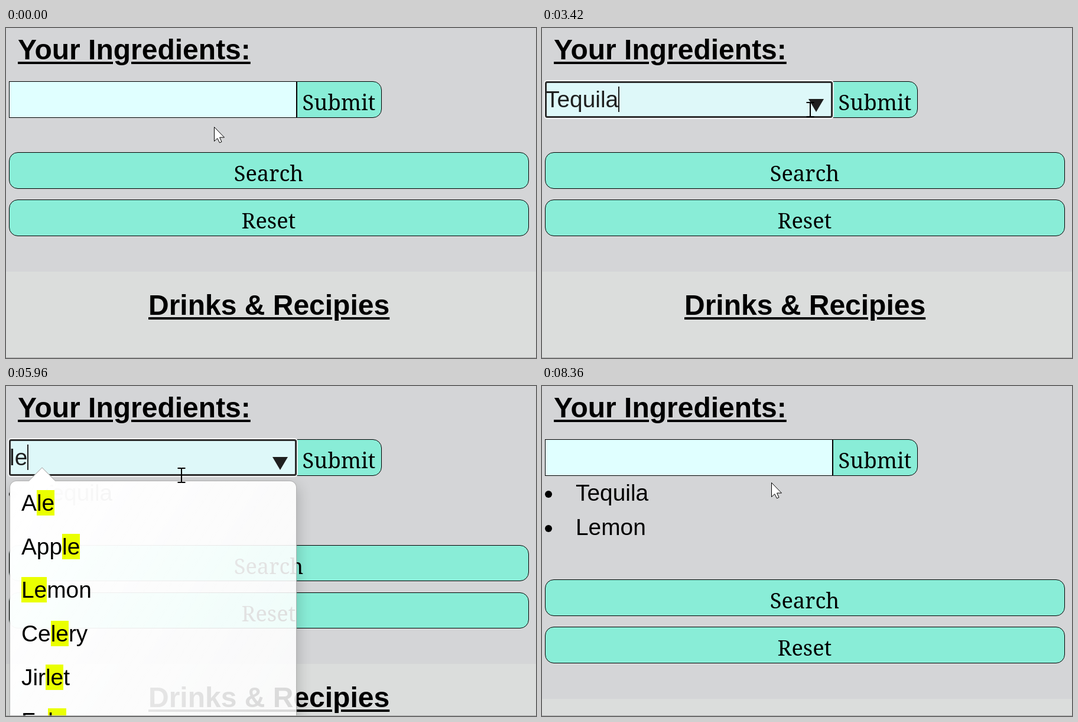
An HTML page for the animation above (8410 ms loop, 897 by 558 pixels).

```html
<!DOCTYPE html>
<html lang="en">
<head>
<meta charset="utf-8">
<title>Ingredient picker</title>
<style>
  html, body { margin: 0; width: 100%; height: 100%; overflow: hidden; }
  #stage { position: relative; width: 897px; height: 558px; overflow: hidden; background: #d4d5d7;
    color: #000; font: 38.88px/58px "Liberation Sans", Arial, sans-serif; }
  #stage > *, #field > * { position: absolute; box-sizing: border-box; white-space: pre; }
  h1 { margin: 0; font-size: 48px; line-height: 60px; text-decoration: underline 4px; text-underline-offset: 4px; }
  .button { left: 5px; width: 880px; height: 61.65px; border: 1px solid #000; border-radius: 15px; background: #89edd7;
    font: 36.3px/68px "Noto Serif", serif; text-align: center; text-indent: -1px; }
  #submit { left: 492px; top: 90.25px; width: 144px; border-radius: 0 15px 15px 0; }
  #field { left: 5px; top: 90px; width: 487px; height: 62px; }
  #box { inset: 0; border: 1px solid #000; background: #e0ffff; }
  #ring { inset: 0; border: 3px solid #101010; border-radius: 4px; background: #e0ffff; box-shadow: 0 0 0 2px #fff; }
  #text { left: 1px; top: 0; line-height: 62px; }
  #caret { display: inline-block; width: 2px; height: 43px; margin-right: -2px; background: #000; vertical-align: -8px; }
  #arrow { left: 446px; top: 30px; border: 13px solid transparent; border-top: 22px solid #000; border-bottom: 0; }
  .item::before { content: ""; position: absolute; left: -52px; top: 25px; width: 12px; height: 12px;
    border-radius: 50%; background: #000; }
  .item { left: 57px; }
  #lower { left: 0; width: 897px; height: 200px; background: #dbdddc; }
  #lower h1 { margin: 27px 0 0 241px; }
  #edge { left: 0; top: 557px; width: 897px; height: 1px; background: #a8a9a9; }
  #popup { left: 5.5px; top: 160px; width: 486px; margin: 0; padding: 0; list-style: none; line-height: 1.5;
    border: 1px solid rgba(0, 0, 0, .3); border-radius: .3em; transform-origin: 1.43em -.43em;
    background: linear-gradient(to bottom right, #fff, rgba(255, 255, 255, .8));
    box-shadow: .05em .2em .6em rgba(0, 0, 0, .2); }
  #popup::before { content: ""; position: absolute; top: -.43em; left: 1em; padding: .4em; background: #fff;
    border: inherit; border-right: 0; border-bottom: 0; transform: rotate(45deg); }
  #popup li { position: relative; padding: .2em .5em; }
  mark { color: inherit; background: hsl(65, 100%, 50%); }
  .hover { background: hsl(200, 40%, 80%); }
  .hover mark { background: hsl(68, 100%, 41%); }
  #cursor { left: 0; top: 0; width: 1px; height: 1px; overflow: visible; }
</style>
</head>
<body>
<div id="stage">
  <h1 style="left:20px;top:7px">Your Ingredients:</h1>
  <div id="submit" class="button">Submit</div>
  <div class="item" style="top:152px">Tequila</div>
  <div class="item" style="top:210px">Lemon</div>
  <div id="search" class="button">Search</div>
  <div id="reset" class="button">Reset</div>
  <div id="lower"><h1>Drinks &amp; Recipies</h1></div>
  <div id="field"><div id="box"></div><div id="ring"></div><div id="text"><span id="typed"></span><span id="caret"></span></div><div id="arrow"></div></div>
  <ul id="popup"></ul>
  <div id="edge"></div>
  <svg id="cursor"><path id="shape" stroke="#000" stroke-linejoin="round"/></svg>
</div>
<script>
const LOOP = 8410;
const $ = id => document.getElementById(id);
const items = document.querySelectorAll('.item');

// The screen refreshes in bursts: first time, last time, steps
const bursts = [[0, 0, 1], [380, 780, 5], [1190, 1190, 1], [1390, 1690, 4], [1890, 2710, 9], [2810, 3620, 9],
  [3720, 4540, 9], [4640, 5360, 8], [5560, 6380, 9], [6480, 7290, 9], [7390, 8210, 9], [8310, 8360, 2]];
const ticks = bursts.flatMap(([from, to, n]) =>
  Array.from({ length: n }, (_, i) => i < n - 1 ? from + 100 * i : to));

const typing = [[0, ''], [1190, 't'], [1390, 'te'], [1890, 'teq'], [2880, 'Tequila'], [3800, ''],
  [5560, 'l'], [5640, 'le'], [7105, 'Lemon'], [7800, '']];
const focusSpans = [[680, 3800], [5260, 7800]];
const popupSpans = [[1365, 2880], [5640, 7105]];
const submits = [3800, 7800];
const queries = [[0, 'te'], [1890, 'teq'], [5500, 'le']];
const choices = {
  te: ['Tea', 'Water', 'Butter', 'Zovite', 'Bitters', 'Tequila', 'Iced tea', 'Hot water', 'Gold Tequila', 'Tequila vane'],
  teq: ['Tequila', 'Gold Tequila', 'Tequila vane'],
  le: ['Ale', 'Apple', 'Lemon', 'Celery', 'Jirlet', 'Falernum', 'Lemonade', 'Lemon peel', 'Lemon juice', 'Lemon-lime soda']
};
const path = [[0, 352, 167], [280, 352, 167], [680, 319, 113], [1950, 319, 113], [2450, 237, 157], [2710, 172, 193],
  [2910, 172, 193], [3620, 572, 115], [4120, 572, 115], [4640, 440, 125], [5260, 297, 151], [6000, 297, 151],
  [6600, 230, 346], [7080, 230, 346], [7290, 372, 145], [7690, 572, 113], [8210, 572, 113], [8310, 480, 158],
  [8360, 388, 163], [LOOP, 388, 163]];
const cursors = {
  arrow: ['M.5.5V24.5L5.8 19.6 9.5 27 13 25.4 9.6 18H17.5Z', '#fff', 1],
  hand: ['M-3 18V1.5Q-3-1-.5-1T2 1.5V9Q5 7.5 6.5 10 9.5 9 10.5 11.5 13 11 13 14V20Q13 23 11 26V30H-1V27Q-4 24-6 20L-10 16Q-10 12-7 13ZM2 9V15M6.5 10V15M10.5 11.5V15', '#fff', 1.2],
  beam: ['M-6.5-12H-1L0-11 1-12H6.5M0-11V11M-6.5 12H-1L0 11 1 12H6.5', 'none', 2]
};

const latest = (list, t) => list.findLast(e => e[0] <= t)[1];
const within = (spans, t) => spans.some(([a, b]) => t >= a && t < b);

function bezier(x1, y1, x2, y2) {
  const at = (a, b, u) => 3 * (1 - u) ** 2 * u * a + 3 * (1 - u) * u * u * b + u ** 3;
  return x => {
    if (x <= 0 || x >= 1) return x <= 0 ? 0 : 1;
    let lo = 0, hi = 1;
    for (let i = 0; i < 24; i++) {
      const mid = (lo + hi) / 2;
      if (at(x1, x2, mid) < x) lo = mid; else hi = mid;
    }
    return at(y1, y2, lo);
  };
}
const spring = bezier(.4, .2, .5, 1.4);
const ease = bezier(.25, .1, .25, 1);

function popupScale(t) {
  const span = popupSpans.findLast(s => s[0] <= t);
  if (!span) return 0;
  return t < span[1] ? spring((t - span[0]) / 300) : 1 - ease((t - span[1]) / 300);
}

function pointer(t) {
  const i = path.findLastIndex(p => p[0] <= t);
  const [a, x, y] = path[i], [b, x2, y2] = path[i + 1];
  const k = (t - a) / (b - a);
  return [x + (x2 - x) * k, y + (y2 - y) * k];
}

let shown;
function fill(query) {
  if (query === shown) return;
  shown = query;
  const hit = new RegExp(query, 'gi');
  $('popup').innerHTML = choices[query].map(c => `<li>${c.replace(hit, '<mark>$&</mark>')}</li>`).join('');
}

function draw(t) {
  const [x, y] = pointer(t);
  const inside = (l, top, r, b) => x >= l && x < r && y >= top && y < b;
  const overField = inside(5, 90, 492, 152);
  const overSubmit = inside(492, 90, 636, 152);
  const focused = within(focusSpans, t);
  const show = (id, on) => { $(id).style.display = on ? '' : 'none'; };

  $('typed').textContent = latest(typing, t);
  show('box', !focused);
  show('ring', focused);
  show('caret', focused);
  show('arrow', focused || overField);
  $('field').style.opacity = overField ? .85 : 1;
  $('submit').style.opacity = overSubmit ? .85 : 1;

  fill(latest(queries, t));
  const scale = popupScale(t);
  $('popup').style.transform = scale === 1 ? 'none' : `scale(${scale})`;
  $('popup').style.opacity = scale;
  const rows = $('popup').children;
  const overList = within(popupSpans, t) && inside(6, 161, 491, 161 + 73.9 * rows.length);
  const row = overList ? Math.floor((y - 161) / 73.9) : -1;
  [...rows].forEach((li, i) => li.classList.toggle('hover', i === row));

  // Each submitted item pushes the rest down by one line
  const count = submits.filter(s => s <= t).length;
  items.forEach((el, i) => { el.style.display = i < count ? '' : 'none'; });
  const place = (id, top) => { $(id).style.top = top + 58.32 * count + 'px'; };
  place('search', 210.25);
  place('reset', 290.25);
  place('lower', 412.1);

  const [d, color, width] = cursors[overField ? 'beam' : overSubmit || overList ? 'hand' : 'arrow'];
  const shape = $('shape');
  shape.setAttribute('d', d);
  shape.setAttribute('fill', color);
  shape.setAttribute('stroke-width', width);
  shape.setAttribute('transform', `translate(${Math.round(x)} ${Math.round(y)})`);
}

const start = performance.now();
function loop() {
  const t = (performance.now() - start) % LOOP;
  draw(ticks.findLast(k => k <= t));
  requestAnimationFrame(loop);
}
loop();
</script>
</body>
</html>
```
